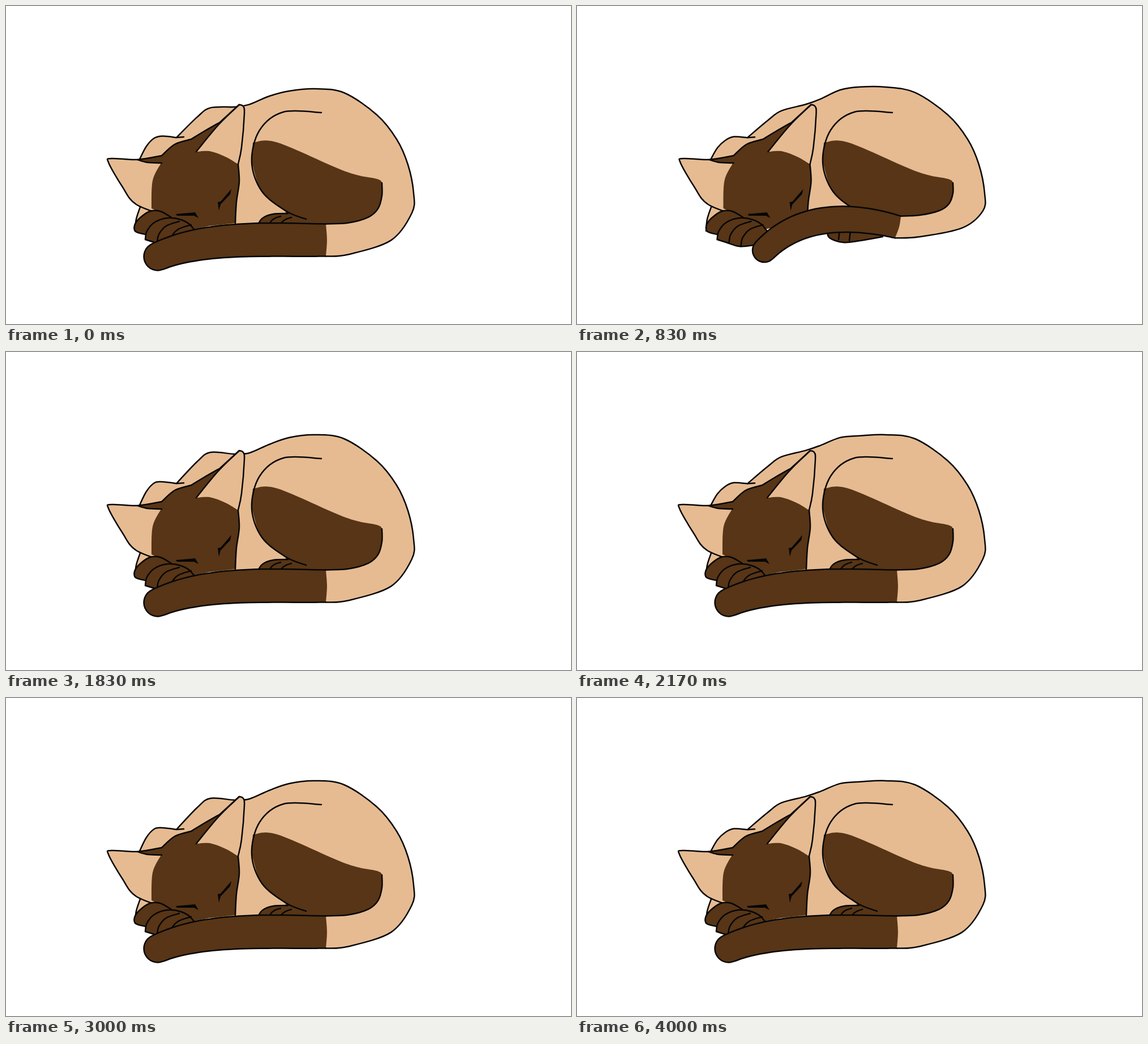
Recreate the animation shown at these times as an HTML page with a canvas. Size 998x561 px, loop 4.17 s.

```html
<!DOCTYPE html>
<html lang="en">
<head>
<meta charset="utf-8">
<title>Sleeping cat</title>
<style>
html, body { margin: 0; height: 100%; overflow: hidden; background: #fff; }
canvas { display: block; }
</style>
</head>
<body>
<canvas id="stage" width="998" height="561"></canvas>
<script>
const ctx = document.getElementById('stage').getContext('2d');
const TAN = '#e6bb92', BROWN = '#573516', INK = '#060606';
const LOOP = 4170, RATE = 6;

const points = text => text.split(',').map(pair => pair.trim().split(' ').map(Number));
const clamp = (v, low, high) => Math.min(high, Math.max(low, v));
const bump = (x, center, width) => Math.exp(-(((x - center) / width) ** 2));
const shift = (curve, dx, dy) => curve.map(([x, y]) => [x + dx, y + dy]);
const flip = curve => [...curve].reverse();

// Smooth curves through key points, joined by straight lines
function trace(curves) {
  ctx.beginPath();
  curves.forEach((curve, n) => {
    ctx[n ? 'lineTo' : 'moveTo'](...curve[0]);
    for (let i = 0; i < curve.length - 1; i++) {
      const p = curve[i], q = curve[i + 1];
      const before = curve[i - 1] || p, after = curve[i + 2] || q;
      ctx.bezierCurveTo(
        p[0] + (q[0] - before[0]) / 6, p[1] + (q[1] - before[1]) / 6,
        q[0] - (after[0] - p[0]) / 6, q[1] - (after[1] - p[1]) / 6, ...q);
    }
  });
}
function fill(color, ...curves) {
  trace(curves);
  ctx.fillStyle = color;
  ctx.fill();
}
function ink(...curves) {
  trace(curves);
  ctx.stroke();
}

// Body
const shoulder = points('236 270,248 246,262 231,277 229,301 232');
const back = points('301 232,338 193,361 177,404 180,430 178,465 163,500 151,545 146,597 153,655 192,690 235,710 280,720 330,717 365,680 413,604 438');
const chest = points('228 397,230 376,238 352');
const haunch = points('557 188,490 187,448 219,434 275,452 327,495 362,530 376');
const patch = points('436 241,480 241,600 292,655 305,664 312');
const seat = points('664 312,664 335,657 358,640 373,605 383');
const foot = points('540 407,500 414,470 417,446 409,443 396,447 382,455 373,472 367,498 366');
const hindToe = points('443 410,447 382,455 373,466 369');

// Tail: four points of a Bezier spine, then the radius at base and tip
const tails = [
  '565 413,470 413,350 405,268 442,28.5 24.5',
  '567 390,500 372,400 360,331 431,20 21',
  '564 425,490 437,390 400,296 366,23.5 20'
].map(points);

// Head
const earLeft = points('275 264,232 271,186 269,181 276,205 318,230 350,288 372');
const earFold = points('232 271,250 276,275 277');
const crown = points('275 264,298 244,327 235');
const earInner = points('327 235,350 221,378 205');
const earEdge = points('336 257,375 210,412 174');
const earRight = points('412 174,419 177,421 190,416 250,410 279');
const brow = points('336 257,360 256,388 266,410 279');
const jaw = points('410 279,412 310,407 346,405 383');
const cheek = points('274 277,259 308,257 357');
const eyes = ['300 367,334 364,340 374,332 370,302 370', '398 323,379 345,374 346,376 361,379 350,396 332'];
const eyeShapes = eyes.map(text => points(text).map(p => [p]));

// Paws
const farPaw = points('246 403,228 397,230 381,252 363,272 362,292 373');
const paw = points('246 412,249 397,262 382,285 374,309 377,327 388,342 415,310 422,285 424,262 417,246 412');
const frontToe = paw.slice(0, 4);

const breathe = (curve, breath, lift) => curve.map(([x, y]) => [x, y
  + breath * (7 * bump(x, 258, 16) + 11 * bump(x, 350, 25) - 16 * bump(x, 445, 45))
  - lift * 5 * bump(x, 505, 55)]);

// Moves the lower part of a curve, fully at the height `full`
const sag = (curve, start, full, dy) => curve.map(([x, y]) =>
  [x, y + dy * clamp((y - start) / (full - start), 0, 1)]);

function tailShape(position) {
  const n = Math.min(1, Math.floor(position)), amount = position - n;
  const [a, b, c, d, [baseR, tipR]] = tails[n].map((p, i) =>
    p.map((v, axis) => v + (tails[n + 1][i][axis] - v) * amount));
  const upper = [], lower = [];
  let heading, tip;
  for (let t = 0; t <= 1; t += 1 / 16) {
    const u = 1 - t;
    const at = k => u ** 3 * a[k] + 3 * u * u * t * b[k] + 3 * u * t * t * c[k] + t ** 3 * d[k];
    const slope = k => u * u * (b[k] - a[k]) + 2 * u * t * (c[k] - b[k]) + t * t * (d[k] - c[k]);
    const r = baseR + (tipR - baseR) * t + 2.5 * Math.sin(Math.PI * t);
    heading = Math.atan2(slope(1), slope(0));
    tip = [at(0), at(1)];
    const side = [-Math.sin(heading) * r, Math.cos(heading) * r];
    upper.push([tip[0] + side[0], tip[1] + side[1]]);
    lower.push([tip[0] - side[0], tip[1] - side[1]]);
  }
  const round = [];
  for (let k = 1; k < 8; k++) {
    const angle = heading + Math.PI * (0.5 - k / 8);
    round.push([tip[0] + tipR * Math.cos(angle), tip[1] + tipR * Math.sin(angle)]);
  }
  return { base: a, top: upper[0], bottom: lower[0], inside: [b[0], a[1]],
    outline: [...upper, ...round, ...flip(lower)] };
}

function drawBody(tail, breath, lift) {
  const front = breathe(shoulder, breath, lift);
  const spine = [...sag(breathe(back, breath, lift), 355, 441, tail.bottom[1] - 441), tail.bottom];
  const rear = [...sag(seat, 312, 385, tail.top[1] - 385), tail.top];
  fill(TAN, front, spine, [tail.base], [[410, 395]], [[300, 380]], [[240, 395]], chest);
  ink(front, spine);
  ink([front.at(-1), [front.at(-1)[0] + 13, front.at(-1)[1] - 1]]);
  ink(chest);
  fill(BROWN, patch, rear, [tail.inside], flip(haunch.slice(2, 6)).slice(0, 3), [patch[0]]);
  fill(BROWN, foot);
  ink(foot);
  for (let i = 1; i < 3; i++) ink(shift(hindToe, 19 * i, 2 * i));
  ink(haunch);
  ink(rear);
}

function drawHead() {
  fill(TAN, earLeft, [[300, 330]]);
  fill(BROWN, crown, earInner, flip(earEdge), brow, jaw, [[360, 388]], [[320, 396]], [[288, 372]], flip(cheek));
  fill(BROWN, earFold, [earLeft[0]]);
  fill(TAN, earEdge, earRight, flip(brow));
  ink(crown, earInner, [earRight[0]]);
  [earLeft, earFold, earEdge, earRight, jaw].forEach(line => ink(line));
  eyeShapes.forEach(eye => fill(INK, ...eye));
}

function drawPaws() {
  for (const shape of [farPaw, paw]) {
    fill(BROWN, shape);
    ink(shape);
  }
  for (let i = 1; i < 3; i++) ink(shift(frontToe, 21 * i, 6 * i));
}

function drawTail({ top, base, bottom, outline }) {
  fill(BROWN, outline, [bottom, [base[0] + 2, base[1]], top]);
  ink(outline);
}

function render(now) {
  const step = Math.min(24, Math.floor((now % LOOP + 4) * RATE / 1000));
  // A breath takes eight drawings; the tail rises in the first one, then drops at once
  const wave = clamp(0.5 + 1.1 * Math.sin((step - 4.5) * Math.PI / 4), 0, 1);
  const breath = wave * Math.min(1, (step + 1) / 3);
  const swing = step < 8 ? Math.max(0, (step - 3) / 2) : 0;
  const lift = Math.min(1, swing);
  const tail = tailShape(swing);

  ctx.fillStyle = '#fff';
  ctx.fillRect(0, 0, 998, 561);
  ctx.strokeStyle = INK;
  ctx.lineWidth = 2.5;
  ctx.lineCap = ctx.lineJoin = 'round';
  drawBody(tail, breath, lift);
  ctx.save();
  ctx.translate(1.5 * lift, 0);
  drawHead();
  drawPaws();
  ctx.restore();
  drawTail(tail);
  requestAnimationFrame(render);
}
requestAnimationFrame(render);
</script>
</body>
</html>
```
